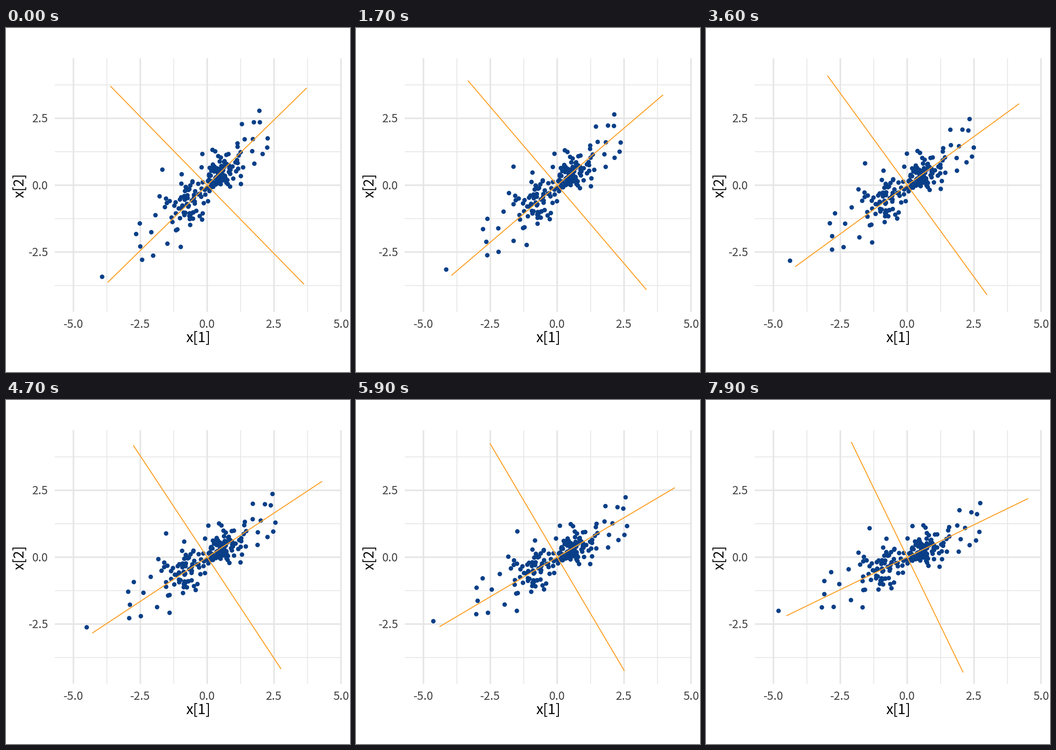
Animation, 748 px wide and 748 px high, one loop 8 s. Source, as a matplotlib script:

```python
import numpy as np
import matplotlib.pyplot as plt
from matplotlib.animation import FuncAnimation

SIZE, DPI = 748, 88
PT = 72 / DPI              # points per pixel
CX, CY, UNIT = 437.5, 341.8, 58.16
FRAMES, INTERVAL = 80, 100
NAVY, ORANGE, GRID = "#083f88", "#fda127", "#e6e6e6"
FONT = "Noto Sans CJK JP"

# The most exposed points of the cloud, in pixels
KEY = [
    (209, 541), (296, 504), (320, 495), (351, 469), (380, 476), (292, 475),
    (283, 448), (291, 425), (316, 444), (325, 407), (334, 366), (340, 308),
    (382, 318), (427, 274), (449, 265), (519, 242), (513, 209), (539, 205),
    (552, 205), (551, 180), (569, 240), (568, 260), (558, 274), (540, 295),
]


def blob(rng, n, along, length, width):
    """Seeded points in an ellipse on the main diagonal, dense in the middle."""
    z = rng.normal(size=(5 * n, 2))
    z = z[np.hypot(*z.T) < 2.1][:n]
    u, v = along + length * z[:, 0], width * z[:, 1]
    return np.column_stack([u - v, u + v]) / np.sqrt(2)


def cloud():
    """Offsets from the centre in pixels, y up."""
    rng = np.random.default_rng(7)
    key = (np.array(KEY) - (CX, CY)) * (1, -1)
    return np.vstack([key,
                      blob(rng, 68, 36, 22, 15),
                      blob(rng, 46, 50, 46, 25),
                      blob(rng, 62, -58, 34, 24)])


def turn(frame):
    """Degrees turned; one step in ten is held."""
    step = frame - max(frame - 1, 0) // 10
    return 0.2606 * (step - 1.23 * (1 - np.exp(-step / 2)))


def rotate(pts, degrees):
    c, s = np.cos(np.radians(degrees)), np.sin(np.radians(degrees))
    x, y = pts.T
    return np.column_stack([CX + c * x + s * y, CY + s * x - c * y])


def axis_line(degrees, half):
    a = np.radians(degrees)
    dx, dy = half * np.cos(a), half * np.sin(a)
    return [CX - dx, CX + dx], [CY + dy, CY - dy]


fig = plt.figure(figsize=(SIZE / DPI, SIZE / DPI), dpi=DPI, facecolor="white")
ax = fig.add_axes([0, 0, 1, 1])
ax.set_xlim(0, SIZE)
ax.set_ylim(SIZE, 0)
ax.axis("off")


def grid(xs, ys, width):
    style = dict(color=GRID, lw=width * PT, solid_capstyle="butt",
                 snap=False, zorder=1)
    for y in ys:
        ax.plot([106, 730.5], [CY - y * UNIT] * 2, **style)
    for x in xs:
        ax.plot([CX + x * UNIT] * 2, [66, 617], **style)


def label(x, y, text, px, color, ha="center", rotation=0):
    ax.text(x, y, text, fontsize=px * PT, color=color, family=FONT, ha=ha,
            va="baseline", rotation=rotation, rotation_mode="anchor")


minor_ticks = np.arange(-3.75, 4, 2.5)
x_ticks, y_ticks = np.arange(-5, 6, 2.5), np.arange(-2.5, 3, 2.5)
grid(minor_ticks, minor_ticks, 1.8)
grid(x_ticks, y_ticks, 3.5)

for v in x_ticks:
    label(CX + v * UNIT, 651.5, f"{v:.1f}", 25, "#434343")
for v in y_ticks:
    label(92, CY - v * UNIT + 9, f"{v:.1f}", 25, "#434343", ha="right")
label(418, 682, "x[1]", 31, "black")
label(38, 342, "x[2]", 31, "black", rotation=90)

points = cloud()
# One size per point keeps sub-pixel positions smooth
dots = ax.scatter(points[:, 0], points[:, 1], color=NAVY, linewidths=0,
                  s=np.full(len(points), (9.8 * PT) ** 2), zorder=2)
line_style = dict(color=ORANGE, lw=2.1 * PT, solid_capstyle="butt", zorder=3)
major, = ax.plot([], [], **line_style)
minor, = ax.plot([], [], **line_style)


def update(frame):
    angle, t = turn(frame), frame / 10
    dots.set_offsets(rotate(points, angle))
    major.set_data(*axis_line(44.33 - angle, 302.4 + 0.45 * t - 0.225 * t * t))
    minor.set_data(*axis_line(134.33 - angle, 301.2 - 0.9 * t - 0.25 * t * t))
    return dots, major, minor


anim = FuncAnimation(fig, update, frames=FRAMES, interval=INTERVAL,
                     init_func=lambda: update(0), repeat=True, repeat_delay=0)
plt.show()
```
